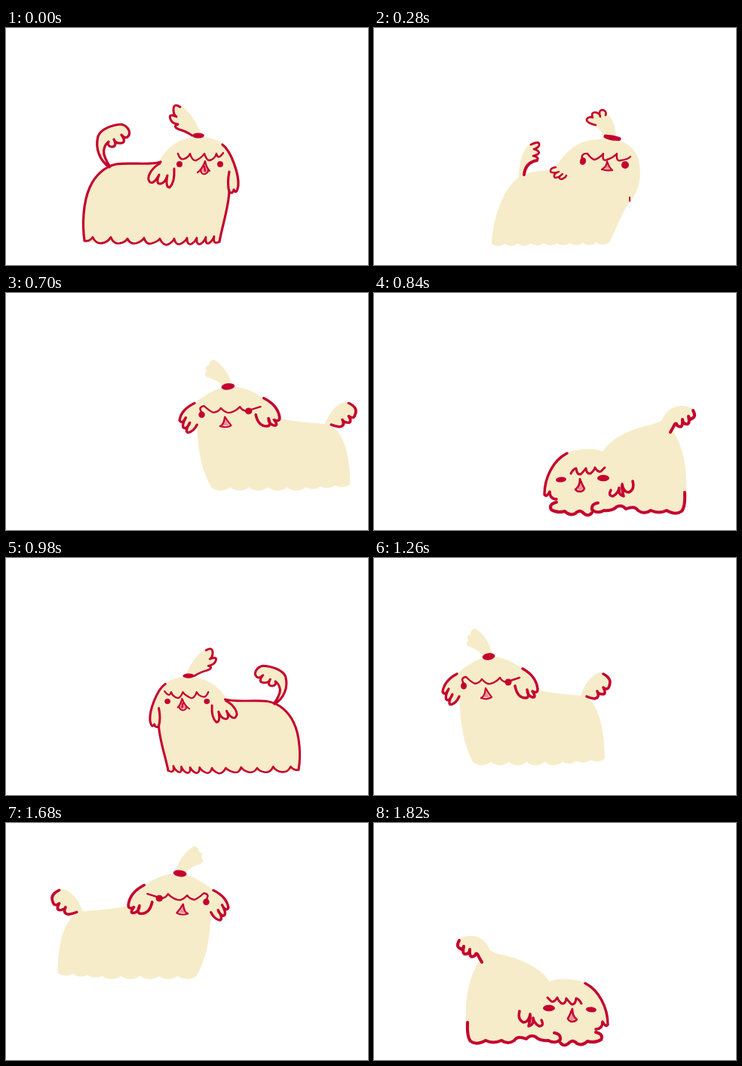
These frames come from a looping animation (480x315 px, 1960 ms). An HTML page with a canvas:

```html
<!DOCTYPE html>
<html lang="en">
<head>
<meta charset="utf-8">
<title>Bouncing dog</title>
<style>
html, body { margin: 0; width: 100%; height: 100%; overflow: hidden; background: #fff; }
canvas { display: block; }
</style>
</head>
<body>
<canvas id="stage" width="480" height="315"></canvas>
<script>
const ctx = document.getElementById('stage').getContext('2d');
const CREAM = '#f6ecc9', RED = '#c4002f', PINK = '#f08c96';
const STEP = 140;

// Row of n hanging tufts, appended to a path
function hem(x0, y0, x1, y1, n, dip) {
  let d = '';
  for (let i = 1; i <= n; i++) {
    const at = k => `${x0 + (x1 - x0) * k / n} ${y0 + (y1 - y0) * k / n + (k % 1 ? dip : 0)}`;
    d += `Q${at(i - 0.5)} ${at(i)}`;
  }
  return d;
}

// box: left, top, right, bottom; lines: [width, path]; spots: x, y, rx, ry, angle
const stand = {
  box: [102, 102, 309, 290],
  fill: ['M137 185C124 176 118 160 122 144C126 134 140 129 153 128C162 130 166 140 160 146L153 153L140 158L136 151Q128 158 130 168L138 184Z',
    'M104 282C101 262 102 232 111 212C118 196 131 184 146 181C165 178 190 183 203 179C209 163 226 147 250 145C270 143 287 149 296 164C301 178 309 200 308 213Q306 222 296 218C296 235 287 262 283 282L278 286' + hem(278, 283, 104, 282, 11, 7) + 'Z',
    'M189 204L205 178L223 187L217 212L205 207Z',
    'M248 144L230 135L219 122L222 104Q230 100 238 108Q252 122 261 146Z'],
  lines: [
    [3.2, 'M137 185C124 176 118 160 122 144C126 134 140 129 153 128C162 130 167 140 161 145Q157 147 153 142Q160 152 153 153Q145 154 143 148Q148 158 140 158Q134 157 136 151Q128 158 130 168Q133 178 138 184'],
    [3.2, 'M104 282C101 262 102 232 111 212C118 196 131 184 146 181C165 178 190 183 205 178'],
    [3.2, 'M287 155C299 164 309 195 308 209Q306 222 302 215Q301 221 296 218Q293 206 296 191M296 216C296 235 287 262 283 284'],
    [2.8, 'M104 283Q111 284 115 278Q119 287 127 286Q135 285 139 278Q143 288 151 286Q158 285 161 280Q165 288 173 286Q180 284 183 279Q186 289 194 286Q201 284 204 280Q208 289 214 288Q221 285 223 280Q225 289 231 287Q238 284 240 279Q240 289 246 287Q251 284 253 279Q252 289 258 287Q263 284 265 278Q264 288 269 286Q274 283 276 277Q274 289 283 284'],
    [3, 'M204 180C193 186 185 199 191 205Q196 208 203 195Q198 208 205 207Q211 206 214 196Q211 212 217 212Q224 205 223 187'],
    [3, 'M231 105Q222 99 222 109Q222 115 226 118Q215 113 218 121Q220 127 228 128Q220 131 230 135Q238 137 247 143'],
    [2.4, 'M228 167Q231 176 236 174Q242 172 244 167Q247 177 252 176Q260 172 263 167Q266 176 270 176Q277 174 279 167Q281 176 288 166'],
    [2.2, 'M254 192Q260 188 264 177Q266 186 270 190M258 189Q259 195 264 194Q269 192 268 187M263 184L264 190']],
  tongue: 'M258 189L264 180L268 188Q266 196 258 189Z',
  spots: [[255, 143, 8, 3.5, 0], [230, 181, 4, 4, 0], [284, 181, 4, 4, 0]]
};

const lean = {
  box: [155, 108, 353, 290],
  fill: ['M192 202C192 175 199 156 211 152Q220 152 218 158Q222 164 217 167Q220 173 216 177C208 179 202 186 200 200Z',
    'M156 288C157 255 170 215 192 198C207 189 225 190 238 188C252 168 266 151 290 149C320 144 342 152 350 172C356 195 352 215 341 229C330 242 322 265 312 285' + hem(312, 285, 156, 287, 9, 6) + 'Z',
    'M304 147Q302 134 293 131Q282 128 282 121Q285 117 290 119Q288 112 296 113Q302 106 309 114C318 122 321 135 321 148Z'],
  lines: [
    [2.8, 'M208 155Q220 149 219 156Q217 160 212 161Q222 164 217 168L211 170Q220 172 216 176'],
    [4, 'M216 176C205 178 200 186 199 195'],
    [2.6, 'M294 129Q281 126 282 121Q285 117 290 119M290 119Q287 112 294 112Q300 114 300 118Q297 108 304 109Q309 111 307 116'],
    [2.4, 'M276 176Q274 166 283 167Q289 175 293 175Q300 172 304 167Q302 178 309 175Q318 172 322 167Q321 178 327 176Q336 175 340 171'],
    [2.4, 'M241 185Q233 186 234 191Q238 194 245 191Q236 195 240 199Q245 199 250 194Q242 200 249 201Q254 199 255 196'],
    [2.2, 'M302 188Q309 184 309 177Q312 186 316 189Q309 190 302 188'],
    [2, 'M339 225L339 230'],
    [5, 'M307 144L325 147.500']],
  tongue: 'M306 187L310 180L313 188Z',
  spots: [[277, 177, 4, 5, 0.3], [333, 182, 5, 5, 0], [316, 146, 11, 3.5, 0.15]]
};

const rear = {
  box: [224, 91, 427, 269],
  fill: ['M259 200C262 184 250 174 238 173Q231 176 231 181L235 183L233 188L240 186L241 191L247 188Q253 191 256 200Z',
    'M247 236Q235 222 226 216Q228 209 246 217C256 198 285 182 312 180C322 176 325 168 320 165L307 160Q306 140 317 120C330 100 350 95 370 92C395 97 411 125 415 160L418 188Q429 203 424 216L418 215L413 224L395 231L391 245L384 244L383 243Q372 255 345 264' + hem(345, 264, 280, 264, 5, 6) + 'Q272 266 270 261Q261 263 259 257Q250 256 251 249Q245 246 247 236Z',
    'M308 161Q305 140 317 121L333 128Q339 150 336 160L331 166L320 166Z',
    'M337 97Q320 92 305 99L293 107L297 112L291 116L295 123L303 118L303 126Q315 117 328 116Z'],
  lines: [
    [2.8, 'M259 200C262 184 250 174 238 173Q231 176 231 181Q235 186 239 179Q231 188 234 188Q241 189 244 183Q238 191 244 191Q252 188 256 200'],
    [3.2, 'M247 236Q235 222 226 216Q227 209 246 217M244 218Q250 208 258 202C270 190 284 183 306 179'],
    [3.2, 'M356 94C378 87 399 108 408 130C414 146 415 165 418 190'],
    [2.8, 'M419 189Q430 205 424 216Q418 218 417 211L418 190M386 234Q381 242 385 245Q390 246 391 238L394 229M337 264L343 263M352 259L357 258'],
    [3.2, 'M317 122C308 134 304 157 309 161Q315 161 316 153Q315 165 320 166Q326 162 326 154Q327 165 331 166Q337 162 337 149Q337 140 331 130'],
    [3.2, 'M339 98Q322 91 305 99Q293 104 293 108M293 108Q295 114 303 110Q291 113 292 118Q295 125 302 117Q296 127 303 125Q309 119 315 118'],
    [2.4, 'M338 124Q338 131 344 128Q345 122 350 125Q355 126 356 118Q361 120 363 116Q363 108 367 107Q374 105 372 97'],
    [2, 'M377 124Q379 131 382 137Q382 132 392 129Q384 128 377 124M380 126L388 132M379 127L384 133']],
  tongue: 'M379 126L383 134L389 129Z',
  spots: [[333, 103, 8, 4.5, -0.6], [345, 135, 5.5, 4.8, 0], [381, 104, 5, 4.5, 0]]
};

const crouch = {
  box: [225, 150, 427, 297],
  fill: ['M380 176C384 158 395 150 408 150C420 150 427 156 426 164Q424 172 418 172Q412 178 404 177Q398 177 391 186Z',
    'M226 268C226 240 238 218 256 212C275 206 295 206 303 211C315 192 340 182 362 176Q375 174 384 168C402 185 414 215 414 250Q416 270 411 286L399 293L390 289L378 292L366 289L357 292L345 285L325 283L305 289L288 293L276 291L265 294L253 290L236 289Q231 283 239 275L233 267Z'],
  lines: [
    [4, 'M423 156Q428 165 421 167Q419 170 417 164Q420 178 411 173Q409 171 409 168Q410 182 402 176Q400 170 397 178L393 185'],
    [3.5, 'M256 213C238 222 226 245 226 268Q229 272 233 264Q233 274 242 274'],
    [4, 'M242 278Q231 281 235 288Q243 293 253 290Q260 297 267 293Q272 288 276 291Q284 299 289 292M297 279Q288 280 289 288Q296 294 305 289Q316 290 322 284Q329 281 334 287Q346 282 350 289Q358 295 367 289Q378 294 388 289Q400 296 408 290Q413 284 412 265'],
    [3, 'M261 240Q264 234 268 233Q269 242 274 241Q279 236 281 233Q282 241 287 240Q292 236 293 232Q297 239 301 237L306 232'],
    [3.5, 'M314 262Q310 270 317 270Q324 266 325 259Q324 269 331 270Q328 259 329 254Q331 265 338 265Q346 261 343 250'],
    [2.6, 'M267 261Q273 257 273 247Q276 255 279 260Q277 264 273 264Q269 264 267 261']],
  tongue: 'M270 260L273 252L277 260Q273 265 270 260Z',
  spots: [[248, 248, 7, 3.5, -0.1], [304, 246, 8, 4.3, 0]]
};

const trot = {
  box: [90, 93, 314, 279],
  fill: ['M273 188C278 168 288 155 300 152Q312 154 313 166Q313 176 306 177Q300 187 291 187Q285 187 279 188Z',
    'M110 154C128 139 140 132 155 131C180 131 210 152 217 175C235 180 255 181 275 183C292 187 305 210 306 267' + hem(306, 267, 250, 271, 3, 6) + hem(250, 271, 131, 271, 5, 9) + 'C119 248 114 220 113 185L102 195L97 188L91 180Q95 162 110 154Z',
    'M187 168L217 174L212 184L201 187L192 183Z',
    'M147 132Q138 121 126 118Q120 114 125 110Q122 102 128 102Q128 94 135 94C146 102 153 112 158 130Z'],
  lines: [
    [3.2, 'M110 154Q93 163 91 178Q94 184 99 174Q92 188 98 189Q103 186 104 181Q97 194 102 195Q109 193 113 184'],
    [3.5, 'M197 147Q215 157 217 174Q217 181 210 177Q216 186 210 185Q203 183 203 175Q207 186 201 186Q190 186 187 170'],
    [3.5, 'M304 154Q316 160 312 170Q310 177 304 172Q309 182 302 181Q297 180 296 177Q300 186 292 187Q286 186 282 184'],
    [2.4, 'M119 167Q114 159 122 158Q130 166 134 167Q140 166 143 161Q150 169 155 167Q162 165 167 159Q172 168 181 163L193 159'],
    [2.2, 'M142 186Q147 184 148 173Q152 180 156 185Q150 189 142 186']],
  tongue: 'M145 185L149 177L153 185Z',
  spots: [[152, 131, 8.5, 4.5, -0.15], [119, 170, 4, 4.5, 0], [178, 165, 4.5, 4.5, 0]]
};

// pose, mirrored, then the box it fills
const steps = [
  [stand, 0, 102, 102, 309, 290],
  [stand, 0, 113, 109, 339, 290],
  [lean, 0, 155, 108, 353, 290],
  [lean, 0, 212, 110, 404, 289],
  [rear, 0, 224, 91, 427, 269],
  [trot, 0, 229, 88, 465, 266],
  [crouch, 0, 225, 150, 427, 297],
  [stand, 1, 190, 120, 390, 288],
  [trot, 0, 133, 104, 336, 279],
  [trot, 0, 90, 93, 314, 279],
  [lean, 1, 29, 96, 247, 288],
  [rear, 1, 21, 65, 224, 243],
  [trot, 1, 60, 30, 296, 211],
  [crouch, 1, 109, 150, 311, 297]
];

function paint(pose, flip, x0, y0, x1, y1) {
  const [l, t, r, b] = pose.box;
  const sx = (x1 - x0) / (r - l), sy = (y1 - y0) / (b - t);
  ctx.setTransform(flip ? -sx : sx, 0, 0, sy, flip ? x1 + l * sx : x0 - l * sx, y0 - t * sy);
  ctx.fillStyle = CREAM;
  pose.fill.forEach(d => ctx.fill(new Path2D(d)));
  ctx.fillStyle = PINK;
  ctx.fill(new Path2D(pose.tongue));
  ctx.strokeStyle = ctx.fillStyle = RED;
  for (const [width, d] of pose.lines) {
    ctx.lineWidth = width;
    ctx.stroke(new Path2D(d));
  }
  for (const [x, y, rx, ry, turn] of pose.spots) {
    ctx.beginPath();
    ctx.ellipse(x, y, rx, ry, turn, 0, 2 * Math.PI);
    ctx.fill();
  }
}

function frame() {
  ctx.setTransform(1, 0, 0, 1, 0, 0);
  ctx.fillStyle = '#fff';
  ctx.fillRect(0, 0, 480, 315);
  ctx.lineCap = ctx.lineJoin = 'round';
  paint(...steps[Math.floor(performance.now() / STEP) % steps.length]);
  requestAnimationFrame(frame);
}
frame();
</script>
</body>
</html>
```
